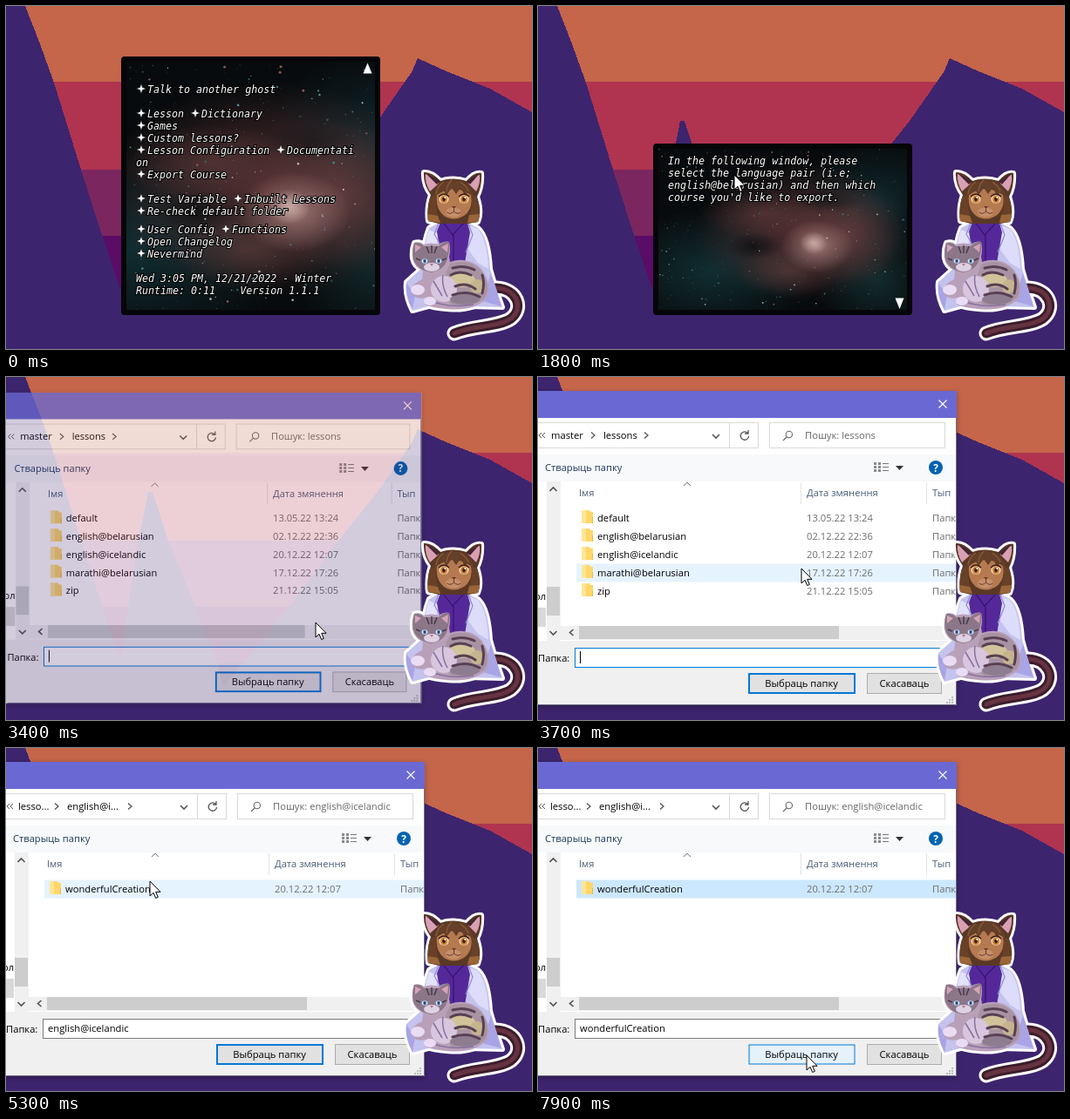
An HTML page that plays this animation: 603 by 394 pixels, repeating every 8000 ms.

```html
<!DOCTYPE html>
<html lang="en">
<head>
<meta charset="utf-8">
<title>Export a course</title>
<style>
html,body{margin:0;width:100%;height:100%;overflow:hidden;background:#3d246e}
svg{display:block;width:603px;height:394px}
text{white-space:pre}
.mono{font:italic 500 11.65px "DejaVu Sans Mono","Noto Sans Mono",monospace;fill:#fff;stroke:#000;stroke-width:2px;paint-order:stroke}
.ui{font:11.2px "Open Sans","Noto Sans",sans-serif}
</style>
</head>
<body>
<svg id="stage" viewBox="0 0 603 394" xmlns="http://www.w3.org/2000/svg"></svg>
<script>
const LOOP = 8000, STEP = 100;
const rect = (x, y, w, h, fill, more = '') => `<rect x="${x}" y="${y}" width="${w}" height="${h}" fill="${fill}" ${more}/>`;
const path = (d, fill, more = '') => `<path d="${d}" fill="${fill}" ${more}/>`;
const line = (d, stroke, width = 1, more = '') => path(d, 'none', `stroke="${stroke}" stroke-width="${width}" ${more}`);
const oval = (x, y, rx, ry, fill, more = '') => `<ellipse cx="${x}" cy="${y}" rx="${rx}" ry="${ry}" fill="${fill}" ${more}/>`;
const ui = (x, y, s, fill = '#000', more = '') => `<text class="ui" x="${x}" y="${y}" fill="${fill}" ${more}>${s}</text>`;
const mono = (x, y, s, more = '') => `<text class="mono" x="${x}" y="${y}" ${more}>${s}</text>`;
const group = (id, body, more = '') => `<g id="${id}" ${more}>${body}</g>`;

function random(seed) {
  return () => (seed = (seed * 16807) % 2147483647) / 2147483647;
}

function scenery() {
  const bands = [[0, 87, '#c5654a'], [87, 101, '#b03450'], [188, 76, '#7b265f'], [264, 64, '#5b0c66'], [328, 66, '#38045d']];
  return bands.map(([y, h, c]) => rect(0, y, 603, h, c)).join('') +
    path('M0 0H22L38 41 55 88 86 188 108 257 131 325 143 246 152 188 163 132H168L186 188 217 264 242 328 249 356 272 328 325 264 381 188 426 132 465 76 472 60 505 75 555 95 603 122V394H0Z', '#3d246e', 'shape-rendering="crispEdges"');
}

// Star field in a local 285 x 185 box
function nebula() {
  const rnd = random(77);
  const clouds = [
    [60, 140, 120, 70, '#16454a', .6], [250, 60, 90, 70, '#143a40', .6], [250, 150, 70, 60, '#1d4a4c', .5],
    [165, 95, 125, 80, '#6b3a3c', .75], [120, 75, 70, 28, '#6b4444', .5], [215, 100, 65, 55, '#7a4848', .6],
    [150, 140, 60, 30, '#6f4745', .5], [182, 112, 42, 30, '#b28a86', .75], [178, 108, 16, 13, '#e0c2bc', .7],
    [110, 112, 32, 16, '#080b0d', .7], [195, 60, 36, 14, '#0b0e10', .5]
  ];
  const tints = ['#3f8d8f', '#5fb3b3', '#d8e6e6', '#a86a68', '#2d686c'];
  let out = rect(0, 0, 285, 185, '#080b0d');
  clouds.forEach(([x, y, rx, ry, c, o], i) => {
    out += `<radialGradient id="c${i}"><stop stop-color="${c}" stop-opacity="${o}"/><stop offset="1" stop-color="${c}" stop-opacity="0"/></radialGradient>` + oval(x, y, rx, ry, `url(#c${i})`);
  });
  for (let i = 0; i < 420; i++) {
    const r = .25 + .75 * rnd() ** 5;
    out += `<circle cx="${(rnd() * 285).toFixed(1)}" cy="${(rnd() * 185).toFixed(1)}" r="${r.toFixed(2)}" fill="${tints[rnd() * 5 | 0]}" opacity=".8"/>`;
  }
  return out;
}

const sparkle = (x, y) => path(`M${x} ${y - 6}L${x + 1.5} ${y - 1.5} ${x + 6} ${y} ${x + 1.5} ${y + 1.5} ${x} ${y + 6} ${x - 1.5} ${y + 1.5} ${x - 6} ${y} ${x - 1.5} ${y - 1.5}Z`, '#fff', 'stroke="#000" stroke-width=".6"');

function menu() {
  const items = [
    [162, 96, 'Talk to another ghost'], [162, 124, 'Lesson'], [224, 124, 'Dictionary'], [162, 138, 'Games'],
    [162, 152, 'Custom lessons?'], [162, 166, 'Lesson Configuration'], [322, 166, 'Documentati'], [162, 194, 'Export Course'],
    [162, 222, 'Test Variable'], [273, 222, 'Inbuilt Lessons'], [162, 236, 'Re-check default folder'],
    [162, 257, 'User Config'], [259, 257, 'Functions'], [162, 271, 'Open Changelog'], [162, 285, 'Nevermind']
  ];
  return items.map(([x, y, s]) => sparkle(x - 7, y - 1) + mono(x, y + 4, s)).join('') +
    mono(149, 184, 'on') + mono(149, 317, 'Wed 3:05 PM, 12/21/2022 - Winter') +
    mono(149, 331, 'Runtime: 0:11    Version 1.1.1') +
    path('M414.500 65.500L419.500 77.500H409.500Z', '#fff') +
    group('underline', line('M162 199.500H253', '#fff'));
}

const balloon = (id, y, clip, place, body) => group(id,
  `<clipPath id="${clip}"><rect x="138" y="${y + 6}" width="285" height="${343 - y}"/></clipPath>` +
  rect(132, y, 297, 355 - y, '#060608', 'rx="4"') +
  `<g clip-path="url(#${clip})"><use href="#nebula" transform="${place}"/></g>` + body);

const speech = ['In the following window, please', 'select the language pair (i.e;', 'english@belarusian) and then which', "course you'd like to export."];

const chevron = (x, y, dx, dy, c = '#555', w = 1.3) => dx
  ? line(`M${x - dx} ${y - 3.5}L${x + dx} ${y}L${x - dx} ${y + 3.5}`, c, w)
  : line(`M${x - 4} ${y - dy}L${x} ${y + dy}L${x + 4} ${y - dy}`, c, w);

const rowTop = i => 151.5 + i * 21;
function fileRow(name, date, i) {
  const y = 166 + i * 21;
  return path(`M50 ${y - 13}h9l1 2h3v13h-13Z`, '#ffd768') + path(`M50 ${y - 13}h5v15h-5Z`, '#ffe596') + line(`M62.500 ${y - 5}v7`, '#e8b84a') +
    ui(68, y, name) + ui(308, y, date, '#6d6d6d') + ui(452, y, 'Папка', '#6d6d6d');
}

function dialog() {
  const files = [['default', '13.05.22 13:24'], ['english@belarusian', '02.12.22 22:36'], ['english@icelandic', '20.12.22 12:07'], ['marathi@belarusian', '17.12.22 17:26'], ['zip', '21.12.22 15:05']];
  const box = 'stroke="#d9d9d9"';
  let icons = '', grip = '';
  for (let i = 0; i < 3; i++) {
    const y = 98 + i * 4;
    icons += rect(385, y, 3, 3, '#8a8a8a') + rect(390, y, 3, 3, '#8a8a8a') + rect(395, y + 1, 7, 1, '#777');
    for (let j = 0; j <= i; j++) grip += rect(474 - j * 3, 367 + i * 3, 2, 2, '#bbb');
  }
  return '<clipPath id="frame"><rect x="-250" y="16" width="730" height="361"/></clipPath>' +
    rect(-250, 16, 730, 361, '#f0f0f0', 'filter="url(#shade)"') + '<g clip-path="url(#frame)">' +
    rect(-250, 16, 730, 31, '#6a69d4') + line('M459.500 26.500l9 9m0 -9l-9 9', '#fff', 1.1) +
    rect(-250, 47, 730, 43, '#fff') + rect(-9.5, 52.5, 229, 29, '#fff', box) + rect(219.5, 52.5, 33, 29, '#fff', box) + rect(265.5, 52.5, 201, 29, '#fff', box) +
    line('M4 64l-3 3 3 3m4 -6l-3 3 3 3', '#555') + chevron(204, 68, 0, 2, '#555', 1.6) +
    line('M240.500 64.500A4.700 4.700 0 1 0 241.600 68M241 61v4h-4', '#555', 1.3) +
    line('M287 72l-5 5', '#fff', 0) + line('M285 69l-4 4M291.500 66a3.700 3.700 0 1 1 -7.400 0a3.700 3.700 0 0 1 7.400 0', '#666', 1.1) +
    group('pathRoot', ui(15, 71, 'master') + chevron(63, 67, 2, 0) + ui(75, 71, 'lessons') + chevron(124, 67, 2, 0)) +
    group('pathSub', ui(14, 71, 'lesso...') + chevron(58, 67, 2, 0) + ui(70, 71, 'english@i...') + chevron(142, 67, 2, 0)) +
    ui(306, 71, '', '#666', 'id="search"') +
    rect(-250, 89, 730, 32, '#f8f9fa') + ui(8, 108, 'Стварыць папку', '#1e395b') + icons + path('M410 102h9l-4.500 5Z', '#333') +
    oval(456, 104, 8, 8, '#0063b1') + ui(456, 108.500, '?', '#fff', 'text-anchor="middle" font-weight="700" style="font-weight:700;font-size:12px"') +
    rect(-250, 120, 730, 183, '#fff') + rect(-20, 265, 29, 22, '#d9d9d9') + ui(-4, 256, 'ол', '#000') +
    rect(10, 120, 16, 183, '#f0f0f0') + rect(10, 241, 15, 33, '#cdcdcd') + chevron(17.500, 129, 0, -2, '#505050', 1.6) + chevron(17.500, 294, 0, 2, '#505050', 1.6) +
    chevron(171, 123, 0, -2, '#777', 1) + ui(47, 137, 'Імя', '#4c5f78') + ui(308, 137, 'Дата змянення', '#4c5f78') + ui(452, 137, 'Тып', '#4c5f78') +
    line('M301.500 121v25M445.500 121v25', '#e3e3e3') + rect(44, 152, 440, 21, '#e5f3ff', 'id="rowLight"') +
    group('lessons', files.map(([n, d], i) => fileRow(n, d, i)).join('')) + group('course', fileRow('wonderfulCreation', '20.12.22 12:07', 0)) +
    rect(26, 286, 454, 16, '#f0f0f0') + rect(47, 286, 298, 15, '#cdcdcd') + chevron(38.500, 293.500, -2, 0, '#505050', 1.6) +
    rect(-250, 303, 730, 74, '#f0f0f0') + ui(0, 327, 'Папка:') + rect(42.5, 311.5, 424, 22, '#fff', 'id="field"') +
    ui(48, 326, '', '#000', 'id="entry"') + rect(48, 315, 1, 14, '#000', 'id="caret"') +
    rect(242, 341, 121, 22, '#e1e1e1', 'id="choose" stroke="#0078d7"') + ui(302, 356, 'Выбраць папку', '#000', 'text-anchor="middle"') +
    rect(377.5, 340.5, 85, 23, '#e1e1e1', 'id="cancel" stroke="#adadad"') + ui(420, 356, 'Скасаваць', '#000', 'text-anchor="middle"') +
    grip + '</g>' + line('M0 376.500H479.500V47', '#6f6d86');
}

function companion() {
  const tail = 'M562 324C586 325 594 347 579 359C565 369 535 367 514 376';
  const head = 'M479 191Q488 190 498 201Q513 196 528 201Q537 190 545 192Q546 207 540 219Q546 237 541 248L530 250H496L484 247Q482 231 487 217Q478 205 479 191Z';
  const coat = 'M500 247L485 255Q477 275 478 300L459 317Q457 333 466 350L484 345H530L569 346Q560 320 555 302Q553 265 541 255L526 247Z';
  const cat = 'M468 272Q475 270 479 274Q488 271 496 274Q502 269 508 271Q510 279 508 288L509 294Q530 287 545 302Q559 322 550 337Q535 351 505 348Q490 347 480 343L486 334Q466 340 464 326Q467 318 477 314L478 304Q468 300 466 290Q465 280 468 272Z';
  const outline = d => path(d, '#fff', 'stroke="#fff" stroke-width="6" stroke-linejoin="round"');
  const eye = x => oval(x, 222, 5.5, 4.8, '#f7e6cf') + oval(x, 222, 4.2, 4.6, '#d28a35') + oval(x, 222, 1.9, 2.4, '#3b1c18') + oval(x + 1.3, 220, 1, 1, '#fff') +
    line(`M${x - 6} 219Q${x} 213 ${x + 6} 219`, '#351c19', 1.4);
  const catEye = x => oval(x, 293, 3.3, 2.8, '#dce9ff') + oval(x, 293, 2, 2.4, '#5b8fd0') + oval(x, 293, .8, 1.8, '#20233f');
  return line(tail, '#fff', 17, 'stroke-linecap="round"') + [head, coat, cat].map(outline).join('') +
    line(tail, '#3c1c2c', 11, 'stroke-linecap="round"') + line(tail, '#663341', 5, 'stroke-linecap="round"') +
    path(coat, '#c4c3ee') + path('M485 257L496 262 492 280 480 300Q478 275 485 257Z', '#e3e2fb') + path('M530 252L541 256Q552 270 553 302L541 295 530 280Z', '#dddcfa') +
    path('M459 318L469 332 466 349Q457 333 459 318Z', '#a8a4e6') + path('M556 307L568 345 546 339Z', '#a8a4e6') +
    path('M499 246H528L532 260 526 295H500L494 259Z', '#55289a') + line('M500 247L512 263 527 247M513 263V292', '#34146d', 1.2) +
    path('M496 250L491 262 499 276M530 250L535 263 527 283', 'none', 'stroke="#8c8ad0" stroke-width="1.2"') +
    path(head, '#5a3826') + path('M481 193Q490 195 496 204L486 213Q480 203 481 193Z', '#d9a0b4') + path('M543 194Q534 195 530 204L539 213Q544 204 543 194Z', '#d9a0b4') +
    path('M480 191L498 201 494 205ZM544 191L528 201 532 205Z', '#432631') +
    path('M494 217Q513 203 533 217Q536 233 525 241Q513 248 502 241Q492 233 494 217Z', '#b57a50') +
    oval(513, 237, 9, 5.5, '#c4906a') + path('M511 230h5l-2.500 3Z', '#6a3430') + line('M513.500 233v3q-4 4 -8 1m8 -1q4 4 8 1', '#6a3430', 1) +
    path('M490 224Q489 205 513 199Q538 205 536 224L531 213 526 217 521 209 516 216 511 209 505 217 501 211 494 217Z', '#643f29') +
    path('M486 220L493 217Q492 237 498 249L484 247Q482 232 486 220ZM540 220L534 217Q535 237 528 249L541 248Q545 234 540 220Z', '#694127') +
    path('M483 239L495 241 498 249 484 247ZM531 240L543 239 541 248 529 249Z', '#9a6538') +
    line('M502 202Q494 207 493 216M511 200Q505 206 505 213M521 202Q529 208 530 213', '#8b5b36', 1.3) +
    group('eyes', eye(502) + eye(525)) + group('lids', line('M497 222Q502 226 507 222M520 222Q525 226 530 222', '#351c19', 1.5)) +
    path(cat, '#b9a0b9') + path('M509 296Q530 289 544 303Q557 322 549 335Q538 345 512 345Q494 324 509 296Z', '#a893a3') +
    oval(523, 315, 15, 8, '#d1c29a') + oval(540, 322, 8, 8, '#c6b48f') + oval(502, 325, 15, 15, '#d8c6df') + oval(526, 337, 17, 6, '#8e7d91') +
    line('M512 301Q525 297 537 303M510 309Q520 303 533 309M515 322Q527 317 538 325M512 332Q528 326 543 334M546 309Q549 318 546 330', '#594052', 3, 'stroke-linecap="round"') +
    line('M490 316L500 333M501 309Q499 321 506 334M490 340Q510 347 536 343', '#8570a0', 1.5) +
    oval(472, 326, 8, 6, '#eadcf4') + oval(486, 339, 7, 5, '#eadcf4') +
    path('M468 272Q475 271 479 276L496 276Q502 270 508 271Q509 280 506 290Q503 303 488 306Q472 304 467 291Q465 280 468 272Z', '#8b7788') +
    path('M469 274L476 277 469 283ZM507 273L499 277 506 283Z', '#d6a4b8') + oval(488, 300, 9, 5, '#dfd1e4') +
    line('M482 276L485 284M488 275V284M494 276L491 284M470 290l5 2M505 290l-5 2', '#493a4b', 1.5) + path('M486 296h4l-2 3Z', '#b4768c') +
    group('catEyes', catEye(480) + catEye(496)) + group('catLids', line('M477 293q3 3 6 0M493 293q3 3 6 0', '#35293c', 1.2));
}

const stage = document.getElementById('stage');
stage.innerHTML = `<defs>${group('nebula', nebula())}<filter id="shade" x="-5%" y="-5%" width="110%" height="110%"><feDropShadow dx="0" dy="2" stdDeviation="3" flood-opacity=".3"/></filter></defs>` +
  scenery() + balloon('menu', 58, 'tall', 'translate(50 64) scale(1.541)', menu()) +
  balloon('speech', 158, 'short', 'translate(138 164)', speech.map((s, i) => mono(149, 182 + i * 14, '', `id="say${i}"`)).join('') + group('more', path('M409.500 335.500H419.500L414.500 348Z', '#fff'))) +
  group('dialog', dialog()) + companion() +
  group('cursor', path('M0 0V17L4 13.300 6.700 19.500 9.300 18.400 6.700 12.300H12Z', '#fff', 'stroke="#000" stroke-width="1"'));

const $ = id => document.getElementById(id);
const show = (id, on) => $(id).setAttribute('visibility', on ? 'inherit' : 'hidden');
const set = (id, name, value) => $(id).setAttribute(name, value);

const route = [
  [300, 562, 88], [500, 440, 170], [700, 330, 225], [900, 262, 228], [1100, 231, 200], [1200, 231, 200], [1400, 225, 194],
  [2200, 225, 194], [2700, 355, 282], [3400, 355, 282], [3700, 302, 220], [4000, 195, 198], [5000, 195, 198], [5300, 165, 153],
  [6200, 165, 153], [6500, 225, 255], [6800, 286, 374], [7100, 291, 356], [7200, 296, 356], [7300, 296, 356], [7500, 270, 355], [7700, 315, 354], [7900, 308, 353]
];
function cursorAt(t) {
  const i = route.findIndex(p => p[0] >= t);
  if (i <= 0) return i ? route.at(-1).slice(1) : route[0].slice(1);
  const [a, b] = [route[i - 1], route[i]];
  const k = (t - a[0]) / (b[0] - a[0]);
  return [1, 2].map(n => a[n] + (b[n] - a[n]) * k);
}

function render(time) {
  const t = Math.floor((time % LOOP) / STEP) * STEP;
  const [x, y] = cursorAt(t);
  show('cursor', t >= 300);
  set('cursor', 'transform', `translate(${Math.round(x)} ${Math.round(y)})`);

  show('menu', t < 1600);
  show('underline', t >= 1300 && t < 1600);
  show('speech', t >= 1600 && t < 3100);
  let left = t >= 1800 ? 999 : (t - 1500) / 100 * 42;
  speech.forEach((s, i) => {
    $('say' + i).textContent = s.slice(0, Math.max(0, left));
    left -= s.length;
  });
  show('more', t >= 1800 && t !== 2500);

  show('dialog', t >= 3300);
  const opening = { 3300: [.35, .96], 3400: [.77, .989], 3500: [.95, .998] };
  const [alpha, scale] = opening[t] || [1, 1];
  set('dialog', 'opacity', alpha);
  set('dialog', 'transform', `translate(134 196.5) scale(${scale}) translate(-134 -196.5)`);

  const inside = t >= 4800;
  show('pathRoot', !inside);
  show('pathSub', inside);
  show('lessons', t < 4800);
  show('course', t >= 4900);
  $('search').textContent = 'Пошук: ' + (t >= 5100 ? 'english@icelandic' : 'lessons');
  $('entry').textContent = t >= 5900 ? 'wonderfulCreation' : t >= 4400 ? 'english@icelandic' : '';
  show('caret', t < 4100);
  set('field', 'stroke', t < 4100 ? '#0078d7' : '#7a7a7a');

  const picked = t >= 5900 ? 0 : t >= 4100 && !inside ? 2 : -1;
  const hovered = t >= 3500 && x >= 44 && x < 480 ? Math.floor((y - rowTop(0)) / 21) : -1;
  const row = picked >= 0 ? picked : hovered;
  show('rowLight', row >= 0 && row < (inside ? 1 : 5));
  set('rowLight', 'y', rowTop(Math.max(0, row)));
  set('rowLight', 'fill', picked >= 0 ? '#cce8ff' : '#e5f3ff');
  const over = x > 241 && x < 363 && y > 340 && y < 364;
  set('choose', 'fill', over ? '#e5f1fb' : '#e1e1e1');
  set('choose', 'stroke-width', over ? 1 : 2);

  const blink = [1600, 3900, 4400].includes(t), catBlink = t === 6700;
  show('eyes', !blink);
  show('lids', blink);
  show('catEyes', !catBlink);
  show('catLids', catBlink);
}

const start = performance.now();
function tick() {
  render(performance.now() - start);
  requestAnimationFrame(tick);
}
tick();
</script>
</body>
</html>
```
